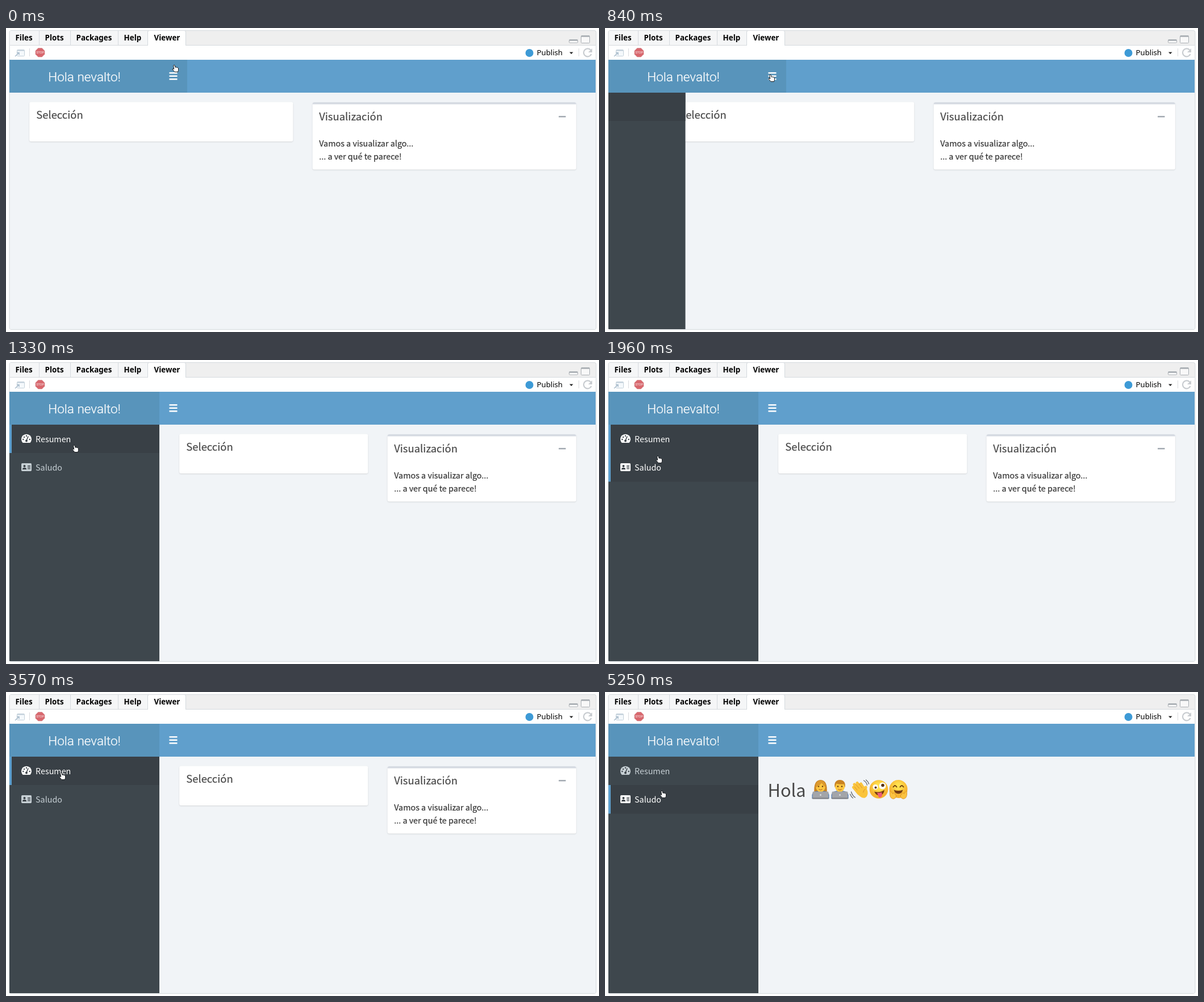
Write an HTML page that moves like this. It is 1044 px wide and 536 px high and loops after 5320 ms.

```html
<!DOCTYPE html>
<html lang="es">
<head>
<meta charset="utf-8">
<title>Dashboard demo</title>
<style>
  html, body { margin: 0; width: 100%; height: 100%; overflow: hidden; background: #fff; }
  svg { display: block; width: 100vw; height: 100vh; }
  text { white-space: pre; }
  .ui { font: 500 13.2px "Noto Sans", "Open Sans", sans-serif; }
  .tabs { font: 700 13.4px "Noto Sans", "Open Sans", sans-serif; }
  .logo { font: 300 22.5px Roboto, "Liberation Sans", sans-serif; fill: #fff; stroke: #fff; stroke-width: .25; text-anchor: middle; }
  .page { font: 400 14.37px "Noto Sans CJK JP", "Noto Sans CJK SC", "Noto Sans CJK", "Noto Sans", sans-serif; }
  #summary text { fill: #333; stroke: #333; stroke-width: .2; }
  #summary .title { font-size: 18.45px; fill: #484848; stroke: #484848; }
  .greeting { font-size: 30.8px; fill: #484848; }
  .box { fill: #fff; filter: drop-shadow(0 1px 1px rgba(0,0,0,.12)); }
  .item { color: #c6cfd4; }
  .item.hot { color: #fff; }
  .item .back { fill: #394046; visibility: hidden; }
  .item .edge { fill: #5d9fce; visibility: hidden; }
  .item.hot .back, .item.hot .edge { visibility: visible; }
  .item .ink, .item text { fill: currentColor; }
  .cut { fill: #394046; }
</style>
</head>
<body>
<svg viewBox="0 0 1044 536">
  <defs>
    <clipPath id="stage"><rect x="6" y="113" width="1032" height="418"/></clipPath>

    <g id="worker">
      <path d="M-15 16V10Q-14 4 -6 3H6Q14 4 15 10V16Z" fill="#3f6fb0"/>
      <rect x="-4" y="-2" width="8" height="8" fill="#eba92f"/>
      <ellipse cy="-5" rx="8.5" ry="10" fill="#fcc63f"/>
      <circle cx="-3.5" cy="-5" r="1.2" fill="#5a3412"/>
      <circle cx="3.5" cy="-5" r="1.2" fill="#5a3412"/>
      <path d="M-3 0Q0 2.5 3 0" fill="none" stroke="#a8561c"/>
    </g>
    <g id="laptop">
      <rect x="-14" y="4" width="28" height="13" rx="1.5" fill="#a3a5a9"/>
      <rect x="-15" y="15" width="30" height="2" rx="1" fill="#7c7f84"/>
      <circle cy="10" r="1.3" fill="#e9eaec"/>
    </g>
    <radialGradient id="skin" cy=".35">
      <stop offset=".3" stop-color="#ffe04f"/>
      <stop offset="1" stop-color="#f6b22f"/>
    </radialGradient>
  </defs>

  <!-- window chrome -->
  <rect x="6" y="4.5" width="1033" height="527" rx="3" fill="#efefef" stroke="#d4d9dd"/>
  <path d="M7 30V5H249V30Z" fill="#f5f6f7"/>
  <path d="M7 30.5H1038M58.5 5V30M113.5 5V30M197.5 5V30" stroke="#d6dade"/>
  <rect x="7" y="31" width="1031" height="26" fill="#fff"/>
  <path d="M249.5 31V7Q249.5 4.5 252 4.5H314Q316.5 4.5 316.5 7V31" fill="#fff" stroke="#d4d9dd"/>
  <rect x="250" y="29" width="66" height="3" fill="#fff"/>
  <g class="tabs">
    <text x="16.5" y="21.5">Files</text>
    <text x="68.5" y="21.5">Plots</text>
    <text x="123.5" y="21.5">Packages</text>
    <text x="207.5" y="21.5">Help</text>
    <text x="260.5" y="21.5">Viewer</text>
  </g>
  <g fill="none" stroke="#a9aeb3">
    <rect x="991.5" y="20.5" width="15" height="5.5" rx="1" fill="#fff"/>
    <path d="M992 21.5H1006" stroke-width="2.5"/>
    <rect x="1012.5" y="13.5" width="15" height="13" rx="1" fill="#f8f8f8"/>
    <path d="M1013 14.5H1027" stroke-width="2.5"/>
  </g>
  <g fill="none" stroke="#c3d0da">
    <rect x="19.5" y="38.5" width="13" height="11" rx="1" fill="#f5f9fc"/>
    <path d="M20 39.5H32" stroke-width="2"/>
    <path d="M16 50L23 43.5M19 43.5H23V47.5" stroke="#a9bccb" stroke-width="1.5"/>
    <path d="M41.5 36V50M1008.5 36V50" stroke="#d9dcdf"/>
  </g>
  <path d="M56.7 35.5H63.3L68 40.2V46.3L63.3 51H56.7L52 46.3V40.2Z" fill="#d8686e" stroke="#c9777b" stroke-width=".5"/>
  <text x="60" y="45.2" text-anchor="middle" font-family="'Liberation Sans', sans-serif" font-size="5" fill="#fff">STOP</text>
  <circle cx="921.5" cy="44" r="7" fill="#3d9ad6"/>
  <text class="ui" x="934.5" y="48">Publish</text>
  <path d="M992 42.5H998.5L995.25 46Z" fill="#222"/>
  <path d="M1029.5 39A7 7 0 1 0 1030.5 46" fill="none" stroke="#c8ccd0" stroke-width="2.2"/>
  <path d="M1032 36V43H1025Z" fill="#c8ccd0"/>

  <!-- page -->
  <rect x="7" y="113" width="1031" height="418" fill="#f1f4f7"/>
  <g class="page" clip-path="url(#stage)">
    <g id="summary">
      <rect id="box1" class="box" y="130.5" height="69.5" rx="3"/>
      <g id="text1"><text class="title" x="12" y="159.5">Selección</text></g>
      <rect id="box2" class="box" y="131" height="118.5" rx="3"/>
      <path id="rim" fill="#d5dae2"/>
      <g id="text2">
        <text class="title" x="11.5" y="163">Visualización</text>
        <text x="11.5" y="209">Vamos a visualizar algo...</text>
        <text x="11.5" y="232">... a ver qué te parece!</text>
      </g>
      <rect x="973" y="155" width="12.5" height="2.5" rx=".5" fill="#a3aab2"/>
    </g>

    <g id="hello">
      <text class="greeting" x="286.5" y="185">Hola</text>
      <g transform="translate(379.5 171.5)">
        <path d="M-11 7Q-13 -16 0 -16.5Q13 -16 11 7Z" fill="#c98322"/>
        <use href="#worker"/>
        <path d="M-9 -3Q-9 -15 0 -15.5Q9 -15 9 -3Q5 -6 2 -11Q-3 -5 -9 -3Z" fill="#dc992e"/>
        <use href="#laptop"/>
      </g>
      <g transform="translate(413.5 171.5)">
        <use href="#worker"/>
        <path d="M-9 -3Q-11 -16 0 -16.5Q11 -16 9 -3L7 -9Q0 -8 -6 -10Z" fill="#c98322"/>
        <use href="#laptop"/>
      </g>
      <g transform="translate(448.5 172)" fill="none" stroke-linecap="round">
        <path d="M-2 7L-11 -4M1 4L-9.5 -9M5 2L-4.5 -11.5M9 1L2 -10M9 6L10.5 -4" stroke="#fac43c" stroke-width="5"/>
        <path d="M-4 5L5 -2L11 -1Q15 9 9 13Q3 15 -4 5Z" fill="#fac43c" stroke="#fac43c" stroke-width="3"/>
        <path d="M-4.5 1L-9 -4.5M-1 -2L-7 -9.5M4 -3L-1.5 -10.5M6 5Q7 1 9.5 -1" stroke="#dd932b"/>
        <path d="M7 -16Q12 -13 13 -8M11 -17Q15 -14 16 -10M-15 4Q-13 11 -8 14M-17 8Q-15 13 -12 15" stroke="#62676c" stroke-width="1.3"/>
      </g>
      <g transform="translate(482 171.5)">
        <circle r="16.3" fill="url(#skin)"/>
        <circle cx="-6" cy="-4" r="4.5" fill="#fff"/>
        <circle cx="6.5" cy="-6" r="6" fill="#fff"/>
        <circle cx="-5.5" cy="-3" r="2" fill="#593312"/>
        <circle cx="7" cy="-7" r="2.8" fill="#593312"/>
        <path d="M-8 4Q2 7 10 1Q9 10 1 11Q-5 11 -8 4Z" fill="#753c13"/>
        <path d="M-3 6Q2 7 5 5L6 11Q4 16 0 14Z" fill="#ee5b78"/>
      </g>
      <g transform="translate(516.5 171.5)">
        <circle cy="-.5" r="16" fill="url(#skin)"/>
        <path d="M-9 -4Q-6 -9 -3 -4M3 -4Q6 -9 9 -4" fill="none" stroke="#70400f" stroke-width="1.8" stroke-linecap="round"/>
        <path d="M-8 1Q0 4 8 1Q6 8 0 8Q-6 8 -8 1Z" fill="#753c13"/>
        <g fill="#fbc341" stroke="#d98f27" stroke-width=".8">
          <path id="palm" d="M-15 5Q-16 1 -13 4L-10 8L-7 6Q-5 6 -6 9L-4 10Q-3 16 -9 17Q-16 16 -15 5Z"/>
          <use href="#palm" transform="scale(-1 1)"/>
        </g>
      </g>
    </g>

    <g id="sidebar">
      <rect x="6" y="113" width="264" height="418" fill="#3e474d"/>
      <g id="item1" class="item">
        <rect class="back" x="6" y="113" width="264" height="51"/>
        <rect class="edge" x="6" y="113" width="4" height="51"/>
        <path class="ink" d="M29.5 146Q27 143.5 27 139.5A9 8.7 0 0 1 45 139.5Q45 143.5 42.5 146Z"/>
        <path d="M36 142L39.2 134.5" stroke="#394046" stroke-width="1.5"/>
        <g class="cut">
          <circle cx="36" cy="142.5" r="2"/>
          <circle cx="30.3" cy="140" r="1.2"/><circle cx="32" cy="136" r="1.2"/>
          <circle cx="36" cy="133.8" r="1.2"/><circle cx="41.7" cy="140" r="1.2"/>
        </g>
        <text x="52" y="144.5">Resumen</text>
      </g>
      <g id="item2" class="item">
        <rect class="back" x="6" y="164" width="264" height="50.5"/>
        <rect class="edge" x="6" y="164" width="4" height="50.5"/>
        <rect class="ink" x="27" y="182" width="18" height="14" rx="1.8"/>
        <g class="cut">
          <circle cx="32.5" cy="187" r="2"/>
          <path d="M29 193Q29 189.7 32.5 189.7Q36 189.7 36 193Z"/>
          <path d="M38 186H43V187.2H38ZM38 188.5H43V189.7H38ZM38 191H43V192.2H38Z"/>
        </g>
        <text x="52" y="194.5">Saludo</text>
      </g>
    </g>
  </g>

  <!-- header -->
  <rect x="6" y="56" width="1032" height="58" fill="#609fcc"/>
  <rect x="6" y="56" width="264" height="58" fill="#5894bb"/>
  <rect id="toggleHover" x="270" y="56" width="49" height="58" fill="#5894bb"/>
  <text class="logo" x="138" y="94">Hola nevalto!</text>
  <path d="M287.5 79.3H301.5M287.5 84.8H301.5M287.5 90.3H301.5" stroke="#fff" stroke-width="2.5"/>

  <!-- pointers, tip at the origin -->
  <g stroke="#fff" fill="#111" stroke-linejoin="round">
    <path id="arrow" d="M0 0V11L2.6 8.8L4.4 12.5L6.3 11.6L4.6 8H7.5Z" stroke-width=".9"/>
    <path id="hand" d="M-1.3 1.2Q0 -.8 1.3 1.2L2 4.3L3.6 4L4.6 4.6L6 4.5L7.5 6V9.5L6.5 12.5H1L-2.8 8.2Q-3.2 6.3 -1.2 7L-.3 7.7Z" fill="#fff" stroke="#161a1e"/>
  </g>
</svg>

<script>
const LOOP = 5320, STEP = 70, SIDEBAR = 264;
const $ = id => document.getElementById(id);

// Pointer tip: time, x, y
const path = [
  [0, 296, 65], [420, 291, 82], [840, 291, 82], [910, 280, 85], [980, 249, 88],
  [1120, 190, 108], [1330, 120, 150], [1610, 93, 169], [2450, 93, 169],
  [2590, 95.5, 161], [2730, 97, 142], [3710, 97, 142], [4200, 100, 174], [LOOP, 100, 174]
];

const clamp = v => Math.min(1, Math.max(0, v));
const show = (id, on) => $(id).setAttribute('visibility', on ? 'visible' : 'hidden');
const move = (id, x, y = 0) => $(id).setAttribute('transform', `translate(${x} ${y})`);

// The CSS "ease" curve, cubic-bezier(.25, .1, .25, 1)
function ease(x) {
  const bezier = (a, b, s) => 3 * a * s * (1 - s) ** 2 + 3 * b * s * s * (1 - s) + s ** 3;
  let low = 0, high = 1;
  for (let i = 0; i < 20; i++) {
    const mid = (low + high) / 2;
    if (bezier(.25, .25, mid) < x) low = mid; else high = mid;
  }
  return bezier(.1, 1, low);
}

function pointerAt(t) {
  const i = path.findIndex(([time]) => time > t);
  const [t0, x0, y0] = path[i - 1], [t1, x1, y1] = path[i];
  const p = (t - t0) / (t1 - t0);
  return [x0 + (x1 - x0) * p, y0 + (y1 - y0) * p];
}

function placeBox(id, x, width) {
  $(id).setAttribute('x', x);
  $(id).setAttribute('width', width);
}

function layoutSummary(shift) {
  const left = 24 + shift, half = (1021 - left) / 2, pad = 17.2;
  const width = half - 2 * pad, x1 = left + pad, x2 = x1 + half;
  placeBox('box1', x1, width);
  placeBox('box2', x2, width);
  $('rim').setAttribute('d', `M${x2} 134.5V134Q${x2} 131 ${x2 + 3} 131h${width - 6}q3 0 3 3v.5Z`);
  move('text1', x1);
  move('text2', x2);
}

function draw(t) {
  const [x, y] = pointerAt(t);
  const greeting = t >= 2240 && t < 3150 || t >= 4970;
  const overMenu = x < 270 && y > 113.5;

  move('sidebar', SIDEBAR * (ease(clamp((t - 771) / 230)) - 1));
  layoutSummary(SIDEBAR * ease(clamp((t - 780) / 300)));
  show('summary', !greeting);
  show('hello', greeting);
  show('toggleHover', t < 1050);
  $('item1').classList.toggle('hot', !greeting || overMenu && y < 164);
  $('item2').classList.toggle('hot', greeting || overMenu && y >= 164);

  const overLogo = x < 270 && !overMenu;
  show('arrow', overLogo);
  show('hand', !overLogo);
  move('arrow', x, y);
  move('hand', x, y);
}

const start = performance.now();
function tick() {
  const t = (performance.now() - start) % LOOP;
  draw(Math.floor(t / STEP) * STEP);
  requestAnimationFrame(tick);
}
tick();
</script>
</body>
</html>
```
